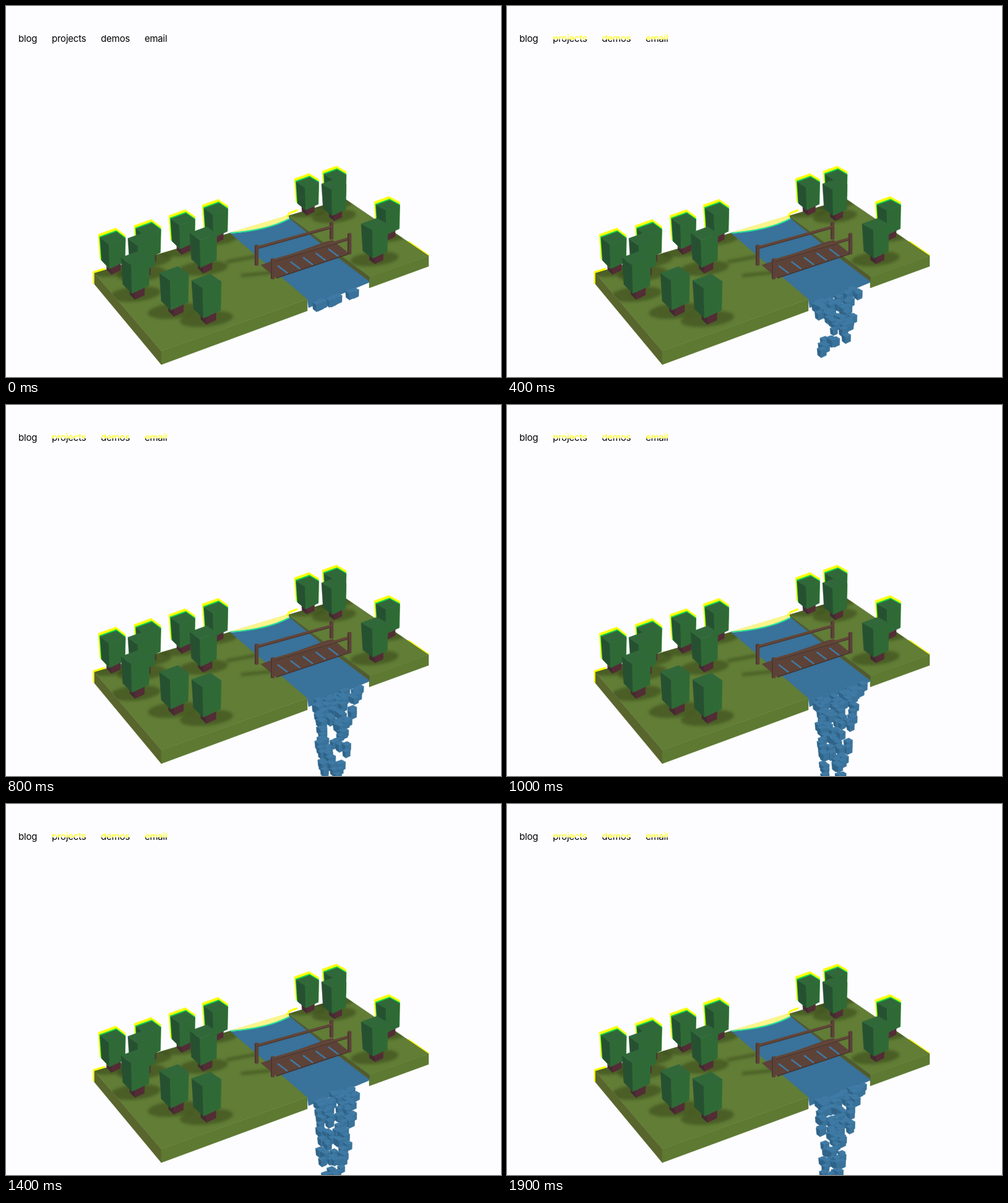
Write an HTML page with a canvas that moves like this. It is 800x600 px and loops after 2000 ms.

```html
<!DOCTYPE html>
<html lang="en">
<head>
<meta charset="utf-8">
<title>River diorama</title>
<style>
html, body { margin: 0; width: 100%; height: 100%; overflow: hidden; background: #fdfdff; }
canvas { position: absolute; left: 0; top: 0; }
nav {
  position: absolute; left: 20px; top: 43px; z-index: 1;
  display: flex; gap: 23.7px;
  font: 15px/20px Inter, "Liberation Sans", sans-serif;
  letter-spacing: -.2px; color: #000;
}
nav.glitch span + span {
  color: transparent;
  background: linear-gradient(#ff0 11px, #000 11px);
  -webkit-background-clip: text; background-clip: text;
}
</style>
</head>
<body>
<nav><span>blog</span><span>projects</span><span>demos</span><span>email</span></nav>
<canvas width="800" height="600"></canvas>
<script>
const LOOP = 2000, STEP = 100;
const nav = document.querySelector('nav');
const screen = document.querySelector('canvas').getContext('2d');
const backdrop = document.createElement('canvas');
backdrop.width = 800;
backdrop.height = 600;

let ctx = backdrop.getContext('2d');

// Block colours: top, left, front.
const LEAF = ['#31683a', '#265131', '#2f6a36'];
const TRUNK = ['#532f33', '#432932', '#532d35'];
const WATER = ['#3f7aa5', '#2f6389', '#39729a'];
const GRASS = ['#617d36', '#58652d', '#5d7932'];
const WOOD = ['#624638', '#46342f', '#5d4238'];
const plain = color => [color, color, color];

function trace(points) {
  ctx.beginPath();
  points.forEach(p => ctx.lineTo(...p));
  ctx.closePath();
}

function poly(fill, ...points) {
  trace(points);
  ctx.fillStyle = ctx.strokeStyle = fill;
  ctx.lineWidth = .5;
  ctx.fill();
  ctx.stroke();
}

function line(color, width, ...points) {
  ctx.beginPath();
  points.forEach(p => ctx.lineTo(...p));
  ctx.strokeStyle = color;
  ctx.lineWidth = width;
  ctx.stroke();
}

// Upright block inside the given bounds, turned slightly with its place on stage.
function box(x, y, w, h, [top, left, front]) {
  const k = x / 800;
  const vx = w * (.33 + .12 * k), vy = vx * (1 - .5 * k) * .85;
  const ux = w - vx, rise = ux * .36;
  const L = [x, y + rise], F = [x + vx, y + rise + vy];
  const R = [x + w, y + vy], B = [x + ux, y];
  const foot = [x + vx + w / 48, y + h];
  poly(left, L, F, foot, [x + w / 16, y + h - vy * 1.2]);
  poly(front, F, R, [x + w - w / 48, y + h - rise * 1.2], foot);
  poly(top, L, B, R, F);
}

// Left edge and foot of each crown, back to front; nearer trees are larger.
const BACK_ROW = [[511, 317], [466, 330], [595, 370], [317, 375], [263, 393], [207, 410], [149, 425]];
const FRONT_ROW = [[510, 339], [574, 408], [297, 423], [197, 432], [186, 465], [248, 492], [300, 505]];
const crownWidth = foot => 39 + (foot - 320) * .048;

function tree([x, foot], fringed) {
  const w = crownWidth(foot), h = w * 1.5, y = foot - h;
  box(x + .28 * w, foot - .6 * w, .55 * w, .81 * w, TRUNK);
  if (!fringed) return box(x, y, w, h, LEAF);
  box(x, y, w, h - 2, plain('#ff0'));
  box(x + 2, y + 4, w - 2, h - 5, plain('#12d64e'));
  box(x + 3, y + 6, w - 3, h - 6, LEAF);
}

function drawLand() {
  const [top, left, front] = GRASS;
  const W = [143, 432], N = [548, 312], E = [683, 404], S = [251, 558];
  line('#ff0', 5, [143, 449], [143, 431], [160, 426]);
  line('#ff0', 3, [650, 381], E);
  poly(left, W, S, [251, 580], [143, 450]);
  poly(front, S, [487, 474], [487, 493], [251, 580]);
  poly(front, [587, 438], E, [683, 421], [587, 456]);
  poly(top, W, N, E, S);

  ctx.save();
  trace([W, N, E, S]);
  ctx.clip();
  ctx.filter = 'blur(2px)';
  ctx.fillStyle = 'rgba(48,58,18,.45)';
  for (const [x, foot] of [...BACK_ROW, ...FRONT_ROW]) {
    const w = crownWidth(foot);
    ctx.beginPath();
    ctx.ellipse(x + w * .5, foot + 1, w * .9, w * .26, -.1, 0, 7);
    ctx.fill();
  }
  line(ctx.fillStyle, 5, [356, 414], [404, 405]);
  line(ctx.fillStyle, 5, [380, 436], [430, 431]);
  ctx.restore();
}

function drawRiver() {
  poly(WATER[2], [362, 367], [456, 340], [587, 438], [587, 447], [489, 488], [487, 474]);
  poly('#535a2c', [456, 340], [587, 438], [587, 445], [537, 407], [464, 348]);
  // Sunlit far edge, where the water melts into the sky.
  ctx.beginPath();
  ctx.moveTo(363, 366);
  ctx.lineTo(456, 338);
  ctx.lineTo(458, 344);
  ctx.quadraticCurveTo(422, 363, 363, 368);
  ctx.fillStyle = '#fbf58c';
  ctx.fill();
  ctx.beginPath();
  ctx.moveTo(363, 367);
  ctx.quadraticCurveTo(422, 363, 458, 344);
  ctx.strokeStyle = '#25df9a';
  ctx.lineWidth = 2;
  ctx.stroke();
  line('#ff0', 3, [454, 341], [458, 335], [471, 330]);
}

function post(x, y, h) {
  poly(WOOD[2], [x, y + 1], [x + 3, y], [x + 6, y + 1], [x + 6, y + h], [x + 3, y + h + 1], [x, y + h]);
  line(WOOD[1], 1.5, [x + 1, y + 2], [x + 1, y + h]);
}

function rail(x1, y1, x2, y2) {
  line(WOOD[0], 4.5, [x1, y1], [x2, y2]);
  line(WOOD[1], 1.2, [x1, y1 + 2], [x2, y2 + 2]);
}

function drawBridge() {
  post(523, 349, 28);
  rail(405, 391, 527, 357);
  post(402, 386, 33);
  poly(WOOD[2], [412, 419], [518, 381], [528, 379], [554, 400], [437, 440]);
  for (let i = 0; i < 5; i++) {
    const x = 439 + i * 20.5, y = 420 - i * 6.8;
    line(WATER[0], 2.5, [x, y], [x + 16, y + 12]);
  }
  line(WOOD[1], 1.5, [437, 440], [554, 401]);
  rail(431, 412, 555, 376);
  post(552, 367, 34);
  post(428, 408, 33);
}

function seeded(seed) {
  return () => (seed = seed * 16807 % 2147483647) / 2147483647;
}

const random = seeded(4127);
const RATE = 150;
const drops = Array.from({ length: RATE * 2.1 }, (_, i) => ({
  born: i / RATE - .06,
  across: random(),
  size: 12 + random() * 4,
  push: random() * 6
}));

// Cubes leave the river's edge, speed up and draw together as they fall.
function drawFall(seconds) {
  drops.map(({ born, across, size, push }) => {
    const age = seconds - born;
    const fall = 30 * age + 300 * age * age;
    const squeeze = 1 - .5 * Math.min(1, Math.sqrt(Math.max(0, fall) / 125));
    return { age, size, x: 520 + (79 * across - 21) * squeeze, y: 481 - 27 * across + push + fall };
  })
    .filter(d => d.age >= 0 && d.y < 620)
    .sort((a, b) => a.y - b.y)
    .forEach(({ x, y, size }) => box(x - size / 2, y - size * .6, size, size * 1.2, WATER));
}

drawLand();
drawRiver();
drawBridge();
BACK_ROW.forEach(t => tree(t, true));
FRONT_ROW.forEach(t => tree(t, false));
ctx = screen;

const start = performance.now();
function render(now) {
  const time = Math.floor(Math.max(0, now - start) % LOOP / STEP) * STEP;
  nav.classList.toggle('glitch', time > 0);
  ctx.clearRect(0, 0, 800, 600);
  ctx.drawImage(backdrop, 0, 0);
  drawFall(time / 1000);
  requestAnimationFrame(render);
}
render(start);
</script>
</body>
</html>
```
